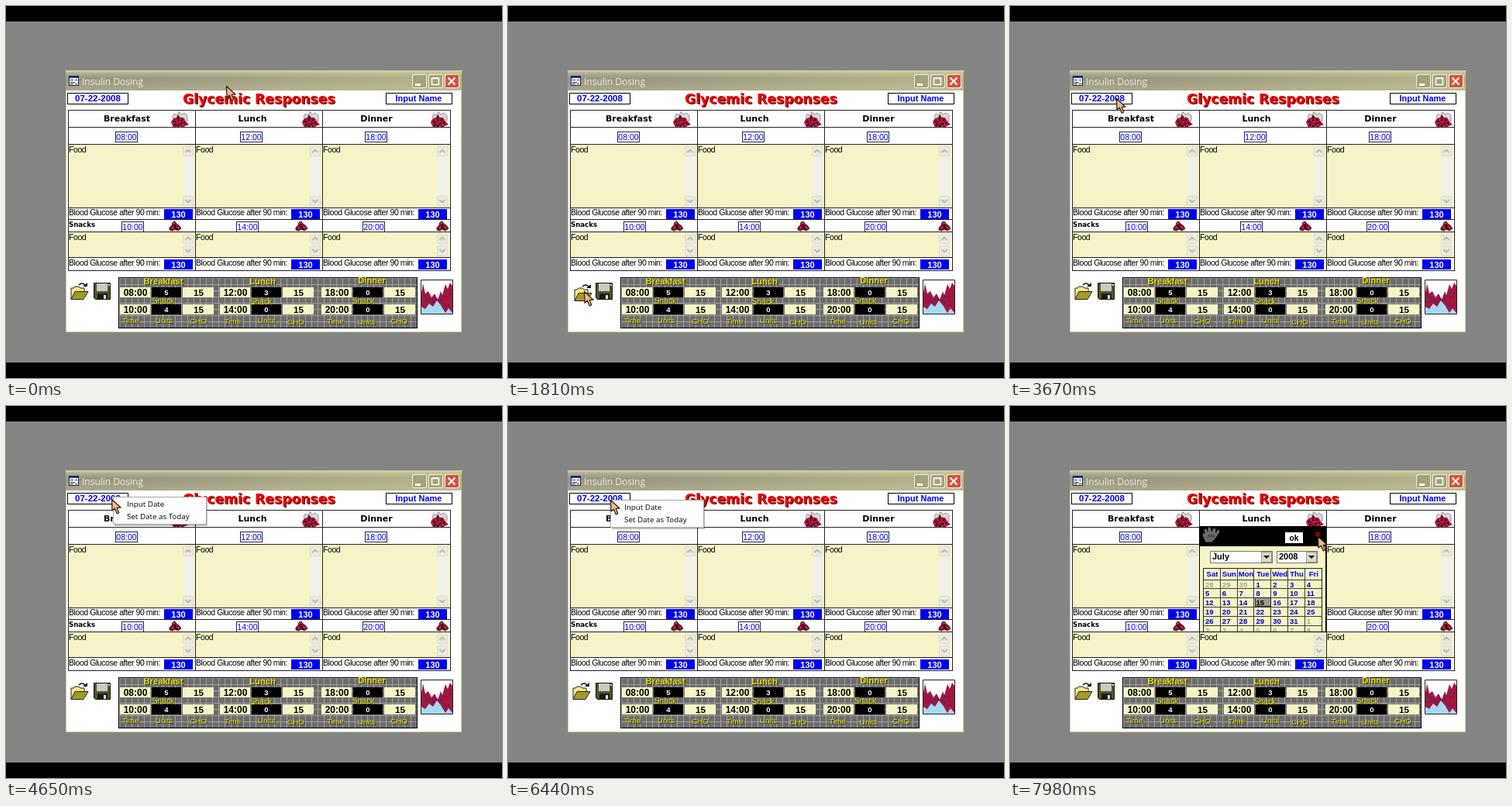
Recreate the animation shown at these times as an HTML page. Size 640 px wide and 480 px high, loop 8 s.

```html
<!DOCTYPE html>
<html lang="en">
<head>
<meta charset="utf-8">
<title>Insulin Dosing</title>
<style>
  html, body { margin: 0; width: 100%; height: 100%; overflow: hidden; background: #000; }
  svg { display: block; width: 640px; height: 480px; }
  rect { shape-rendering: crispEdges; }
  text { font-family: "Liberation Sans", Arial, sans-serif; white-space: pre; }
  .wide { font-family: "DejaVu Sans", Verdana, sans-serif; font-weight: bold; }
  .ui { font-family: "Open Sans", "Noto Sans", sans-serif; }
  .tight { letter-spacing: -.43px; }
  .b { font-weight: bold; }
  .mid { text-anchor: middle; }
</style>
</head>
<body>
<svg viewBox="0 0 640 480">
  <defs>
    <linearGradient id="bar" x2="0" y2="1">
      <stop offset="0" stop-color="#d6d6b4"/>
      <stop offset=".14" stop-color="#b2b092"/>
      <stop offset=".4" stop-color="#98967e"/>
      <stop offset="1" stop-color="#aaa88a"/>
    </linearGradient>
    <linearGradient id="glare">
      <stop offset=".2" stop-color="#d4d29a" stop-opacity="0"/>
      <stop offset="1" stop-color="#d4d29a" stop-opacity=".5"/>
    </linearGradient>
    <pattern id="tiles" width="8" height="8" patternUnits="userSpaceOnUse" x="146" y="351">
      <rect width="8" height="8" fill="#6c6c6c"/>
      <path d="M0 .5H8M.5 0V8" stroke="#a0a0a0"/>
    </pattern>
    <clipPath id="days"><rect x="246" y="205" width="161" height="86"/></clipPath>
    <g id="fruit">
      <path d="M3 8L5 4 9 6 11 1 14 5 18 3 22 6 22 13 17 15 6 14Z" fill="#d8d8d8" stroke="#808080" stroke-width=".8"/>
      <path d="M1 15Q3 9 8 9L10 5 13 9Q18 8 19 13L24 18 19 20Q15 23 11 19 6 23 3 20Z" fill="#a01438"/>
      <path d="M4 14h3M9 12h2M14 12h2M5 18h3M12 17h3M17 16h2M10 7v3M9 20h3" stroke="#400414" stroke-width="1.800"/>
      <path d="M7 12h1M11 15h1M16 18h1M3 17h1" stroke="#f07080"/>
    </g>
    <g id="berry">
      <path d="M1 9L4 6 5 2 8 1 10 4 13 6 16 10 12 13 8 11 5 13 1 12Z" fill="#901030" stroke="#300" stroke-width=".8"/>
      <path d="M5 3h3M11 9h2M4 9h2" stroke="#e06070" stroke-width="1.200"/>
      <path d="M8 5v5M9 11h2" stroke="#200" stroke-width="1.800"/>
    </g>
  </defs>

  <g id="base"></g>

  <g id="folder">
    <path d="M84 378V364h3l2-2h5l2 2h5v4" fill="#f0e888" stroke="#222"/>
    <path d="M84 378.500L89 368.500H106L100 378.500Z" fill="#a49a28" stroke="#222"/>
    <path d="M94 360q4-4 8 0" fill="none" stroke="#111" stroke-width="1.400"/>
    <path d="M99 362h6v-5z" fill="#111"/>
  </g>
  <g>
    <path d="M113.500 357.500h21v21h-19l-2-2z" fill="#55551c" stroke="#111"/>
    <path d="M117 358h14v10h-14z" fill="#c9c9c9"/>
    <path d="M118 371h13v8h-13z" fill="#1a1a1a"/>
    <path d="M126 373h3v5h-3zM132 359h2v2h-2z" fill="#e0e0e0"/>
  </g>
  <g>
    <path d="M535.500 353.500h41v44h-41z" fill="#fff" stroke="#222"/>
    <path d="M536 380h40v17h-40z" fill="#a6d8f6"/>
    <path d="M536 370L538 358 541 371 545 368 549 376 553 371 557 379 561 368 563 373 567 359 570 365 573 357 576 361V396L571 390 567 396 561 386 556 380 551 388 546 384 541 391 536 388Z" fill="#a01840"/>
    <path d="M538 372l5 5 6 4 5-5 6 5 5-8 5 4 5-8M538 383l6-3 6 4 6-6 6 4 6 6 6-4" fill="none" stroke="#602050" stroke-width="1.500" stroke-dasharray="3 2"/>
  </g>

  <g id="calendar"></g>
  <g id="menu"></g>
  <path id="cursor" d="M.5.500L1 15 4.300 12.200 7.300 19 9.800 18 7.200 11.300 12 11Z" fill="#ebb98e" stroke="#3c2216" stroke-width="1.300" stroke-linejoin="round"/>
</svg>

<script>
const $ = id => document.getElementById(id);
const CREAM = '#f6f4c6', BLUE = '#0000f0';
let layer = $('base');

function add(tag, attrs, str) {
  const e = document.createElementNS('http://www.w3.org/2000/svg', tag);
  for (const k in attrs) e.setAttribute(k, attrs[k]);
  if (str) e.textContent = str;
  layer.append(e);
  return e;
}
const fillBox = (x, y, width, height, fill) => add('rect', { x, y, width, height, fill });
function frame(x, y, w, h, fill, edge = '#000') {
  fillBox(x, y, w, h, edge);
  fillBox(x + 1, y + 1, w - 2, h - 2, fill);
}
const text = (x, y, str, size, fill = '#000', cls = '') =>
  add('text', { x, y, 'font-size': size, fill, class: cls }, str);
const line = (d, stroke, width = 1) => add('path', { d, stroke, fill: 'none', 'stroke-width': width });
const icon = (id, x, y) => add('use', { href: '#' + id, x, y });

function drawWindow() {
  fillBox(0, 20, 640, 440, '#848484');
  fillBox(77, 83, 512, 339, '#cccaa2');
  fillBox(77, 83, 512, 26, 'url(#bar)');
  fillBox(77, 83, 512, 26, 'url(#glare)');
  fillBox(588, 84, 1, 338, '#8e8c74');
  fillBox(77, 421, 512, 1, '#8e8c74');
  fillBox(78, 109, 509, 311, '#fff');
  frame(81, 90, 13, 13, '#fff', '#14205c');
  fillBox(82, 91, 11, 2, '#2038a0');
  line('M83 95.500h4M89 95.500h3M83 98.500h6M83 100.500h4M89 100.500h3', '#222');
  text(98, 102, 'Insulin Dosing', 12, '#ecece4', 'ui');

  for (const [x, fill] of [[524, '#a5a37c'], [545, '#a5a37c'], [566, '#d2553c']])
    add('rect', { x: x + .5, y: 88.5, width: 18, height: 17, rx: 2.5, fill, stroke: '#f0f0e0' });
  line('M528 101.500h7', '#fff', 3);
  line('M549.500 93h9v8.500h-9zM549 93.500h10', '#fff', 1.5);
  line('M570.500 92.500l9 9M579.500 92.500l-9 9', '#fff', 2);

  frame(79, 112, 79, 15, '#fff');
  text(118.5, 123, '07-22-2008', 11.5, BLUE, 'b mid');
  frame(490, 112, 86, 15, '#fff');
  text(532.5, 123, 'Input Name', 11, BLUE, 'b mid');
  text(229.3, 127, 'Glycemic Responses', 17.2, '#5c1414', 'wide');
  text(228, 126, 'Glycemic Responses', 17.2, '#f00000', 'wide');
}

function scrollBar(x, y, h) {
  fillBox(x, y, 14, h, '#f1f0e6');
  for (const [top, d] of [[y, 1], [y + h - 14, -1]]) {
    add('rect', { x: x + .5, y: top + .5, width: 13, height: 13, rx: 2, fill: '#ebeadd', stroke: '#dcdbd0' });
    const cy = top + 7;
    line(`M${x + 3.5} ${cy + 2 * d}l3.500 ${-3.5 * d} 3.500 ${3.5 * d}`, '#b8b8ae', 1.8);
  }
}

function glucose(x, y) {
  text(x + 1, y + 9, 'Blood Glucose after 90 min:', 10.5, '#000', 'tight');
  fillBox(x + 124, y + 1, 37, 13, BLUE);
  text(x + 142.5, y + 11.5, '130', 11, '#fff', 'b mid');
}

function timeBox(x, y, str) {
  frame(x, y, 29, 14, '#fff', '#20204c');
  text(x + 14.5, y + 10.5, str, 10.5, BLUE, 'mid');
}

function drawMeal(x, name, nameX, fruitX, berryX, main, snack) {
  text(nameX, 149, name, 11, '#000', 'wide mid');
  icon('fruit', fruitX, 135);
  timeBox(main[0], 162, main[1]);
  fillBox(x + 1, 179, 163, 81, CREAM);
  scrollBar(x + 148, 180, 79);
  text(x + 1, 189, 'Food', 10.5, '#000', 'tight');
  glucose(x, 261);
  timeBox(snack[0], 278, snack[1]);
  icon('berry', berryX, 277);
  fillBox(x + 1, 292, 163, 32, CREAM);
  scrollBar(x + 148, 293, 30);
  text(x + 1, 302, 'Food', 10.5, '#000', 'tight');
  glucose(x, 326);
}

function drawTable() {
  drawMeal(80, 'Breakfast', 156, 212, 210, [141, '08:00'], [149, '10:00']);
  drawMeal(244, 'Lunch', 318, 381, 373, [302, '12:00'], [297, '14:00']);
  drawMeal(408, 'Dinner', 478, 547, 555, [463, '18:00'], [460, '20:00']);
  text(81, 285, 'Snacks', 8.6, '#000', 'wide');
  for (const y of [134, 156, 178, 260, 275, 291, 324, 341]) fillBox(80, y, 494, 1, '#222');
  for (const x of [80, 244, 408, 573]) fillBox(x, 134, 1, 208, '#222');
}

function glow(x, y, str, size, cls) {
  text(x + 1, y + 1, str, size, '#222', cls);
  text(x, y, str, size, '#ece800', cls);
}

function drawDoses() {
  frame(145, 350, 386, 66, 'url(#tiles)');
  const groups = [
    { x: 147, name: 'Breakfast', at: [203, 359], snack: [203, 384], foot: [[160.5, 409], [204, 409], [248, 410]], rows: [['08:00', 5], ['10:00', 4]] },
    { x: 276, name: 'Lunch', at: [331, 359], snack: [329, 385], foot: [[292.5, 410], [336, 409], [374, 411]], rows: [['12:00', 3], ['14:00', 0]] },
    { x: 407, name: 'Dinner', at: [472, 358], snack: [461, 384], foot: [[425, 410], [465, 411], [507, 410]], rows: [['18:00', 0], ['20:00', 0]] }
  ];
  for (const g of groups) {
    g.rows.forEach(([time, units], i) => {
      const y = 363 + 22.5 * i | 0;
      fillBox(g.x, y, 39, 13, CREAM);
      text(g.x + 20, y + 11, time, 12, '#000', 'b mid');
      fillBox(g.x + 41, y, 38, 13, '#000');
      text(g.x + 60, y + 9.5, units + '', 9.5, '#fff', 'b mid');
      fillBox(g.x + 81, y, 40, 13, CREAM);
      text(g.x + 101.500, y + 11, '15', 11.7, '#000', 'b mid');
    });
    glow(...g.at, g.name, 11.2, 'b mid');
    glow(...g.snack, 'Snack', 10.2, 'mid');
    ['Time', 'Units', 'CHO'].forEach((s, i) => glow(...g.foot[i], s, 9.8, 'mid'));
  }
}

function dropDown(x, w, str) {
  frame(x, 187, w, 16, '#fff', '#777');
  text(x + 3, 198, str, 11, '#000', 'b');
  frame(x + w - 15, 188, 14, 14, '#dcd9c8', '#999');
  add('path', { d: `M${x + w - 12} 193h8l-4 4z`, fill: '#000' });
}

function drawCalendar() {
  layer = $('calendar');
  frame(244, 155, 164, 137, CREAM);
  fillBox(244, 155, 164, 26, '#000');
  add('path', {
    d: 'M253 175L249 167 250 164 253 167 251 160 253 159 256 165 256 157 258 157 260 164 263 158 265 159 264 166 269 160 270 162 265 170 260 175Z',
    fill: '#666', stroke: '#8c8c8c', 'stroke-width': .8
  });
  line('M256 166l2 3M260 165l0 4M264 167l-2 3', '#222');
  fillBox(355, 163, 23, 14, '#fff');
  text(366.5, 174, 'ok', 10.2, '#000', 'b mid');
  line('M394.500 163l5 5M399.500 163l-5 5', '#c80000', 1.6);
  dropDown(258, 81, 'July');
  dropDown(344, 53, '2008');

  layer = add('g', { 'clip-path': 'url(#days)' });
  frame(249, 209, 154, 90, CREAM, '#222');
  const col = c => 250 + 21.8 * c, row = r => 223.5 + 11.8 * r;
  for (let c = 1; c < 7; c++) fillBox(Math.round(col(c)) - 1, 210, 1, 82, '#3c3c34');
  for (let r = 0; r < 6; r++) fillBox(250, Math.round(row(r)), 152, 1, '#3c3c34');
  'Sat Sun Mon Tue Wed Thu Fri'.split(' ').forEach((d, c) =>
    text(col(c) + 11, 219.5, d, 9.6, BLUE, 'b mid'));
  for (let i = 0; i < 42; i++) {
    const c = i % 7, r = i / 7 | 0, n = i - 2;
    const inside = n > 0 && n < 32, day = n < 1 ? n + 30 : n > 31 ? n - 31 : n;
    if (n === 15) frame(316, 247, 21, 12, '#9c9a8c', '#222');
    text(col(c) + 2, row(r) + 10, day + '', 9.6, n === 15 ? '#000' : inside ? '#0000c8' : '#a8a488', 'b');
  }
}

function drawMenu() {
  layer = $('menu');
  add('rect', { x: 2, y: 2, width: 120, height: 36, fill: '#000', opacity: .25 });
  frame(0, 0, 121, 36, '#fff', '#aaa89c');
  text(18, 13, 'Input Date', 9.8, '#000', 'ui');
  text(18, 28.5, 'Set Date as Today', 9.8, '#000', 'ui');
}

drawWindow();
drawTable();
drawDoses();
drawCalendar();
drawMenu();

// Pointer moves: first step, last step, step count, Bézier points
const moves = [
  [460, 1240, 14, [[284, 103], [280, 45], [108, 450], [110, 366]]],
  [1300, 1550, 4, [[110, 366], [103, 359], [98, 368]]],
  [2600, 2900, 6, [[98, 368], [60, 256], [127, 145]]],
  [3100, 3280, 4, [[127, 145], [137, 124]]],
  [3610, 3730, 3, [[137, 124], [137, 117]]],
  [4650, 5140, 8, [[137, 117], [130, 155], [108, 148]]],
  [5670, 5910, 5, [[108, 148], [132, 121]]],
  [6500, 6560, 2, [[132, 121], [143, 137]]],
  [6820, 6820, 1, [[143, 137], [146, 134]]],
  [7420, 7980, 8, [[146, 134], [330, 203], [397, 168]]]
];

function bezier(pts, u) {
  while (pts.length > 1)
    pts = pts.slice(1).map((p, i) => p.map((v, k) => pts[i][k] + (v - pts[i][k]) * u));
  return pts[0];
}

function pointer(t) {
  let [x, y] = moves[0][3][0];
  for (const [from, to, n, pts] of moves) {
    if (t < from) break;
    const gap = (to - from) / (n - 1) || 1;
    const u = Math.min(n, Math.floor((t - from) / gap + 1e-6) + 1) / n;
    [x, y] = bezier(pts, u * u * (3 - 2 * u));
  }
  return [Math.round(x), Math.round(y)];
}

const show = (id, on) => $(id).setAttribute('visibility', on ? 'visible' : 'hidden');
const move = (id, x, y) => $(id).setAttribute('transform', `translate(${x} ${y})`);
const between = (t, a, b) => t >= a && t < b;

function render(t) {
  move('cursor', ...pointer(t));
  const push = between(t, 1810, 2140) ? 2 : 0;
  move('folder', push, push);
  const second = between(t, 6440, 7220);
  show('menu', second || between(t, 4190, 5340));
  move('menu', ...(second ? [132, 121] : [138, 117]));
  show('calendar', t >= 7220);
}

const start = performance.now();
function tick() {
  render((performance.now() - start) % 8000);
  requestAnimationFrame(tick);
}
tick();
</script>
</body>
</html>
```
